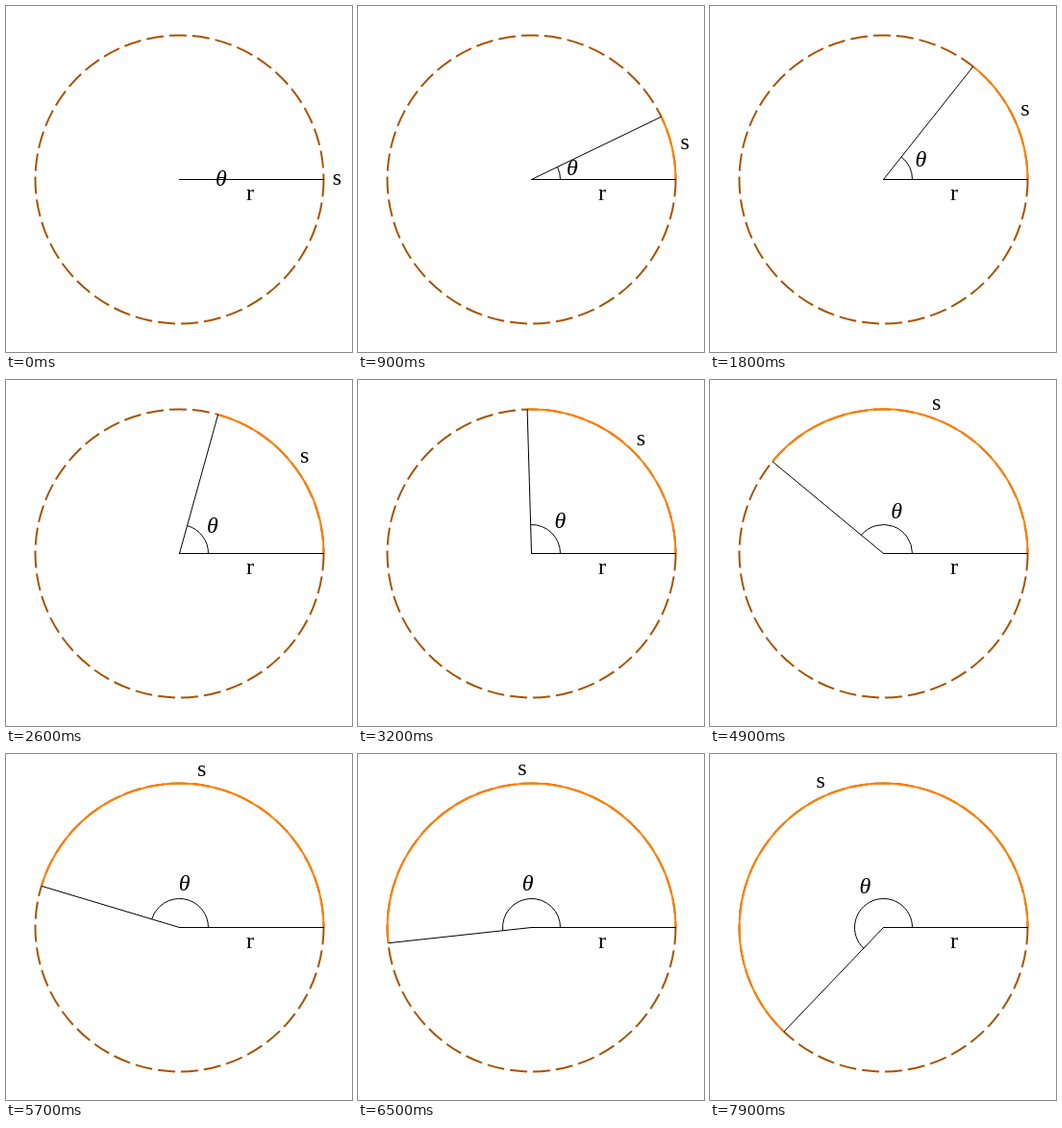
An HTML page for the animation above (8 s loop, 360 px wide and 360 px high).

```html
<!DOCTYPE html>
<html>
<head>
<meta charset="utf-8">
<style>
html, body { margin: 0; width: 100%; height: 100%; overflow: hidden; background: #fff; }
svg { display: block; width: 100vw; height: 100vh; }
path, circle { fill: none; stroke: #000; }
text { font: 24px "Liberation Serif", "Times New Roman", serif; text-anchor: middle; }
#theta { font-style: italic; }
#rim { stroke: #a85400; stroke-width: 2; stroke-dasharray: 18 6; }
#arc { stroke: #ff8000; stroke-width: 2; }
</style>
</head>
<body>
<svg viewBox="0 0 360 360">
  <circle id="rim" cx="180.5" cy="180.5" r="150"/>
  <path id="arc"/>
  <text id="theta">θ</text>
  <text id="s">s</text>
  <text x="254" y="202">r</text>
  <path d="M180 180.5H331"/>
  <path id="radius"/>
  <path id="mark"/>
</svg>
<script>
const C = 180.5, R = 150, LOOP = 8000, STEP = 100, TURN = 0.05;
const $ = id => document.getElementById(id);
const at = (r, a, x = C, y = C) => [x + r * Math.cos(a), y - r * Math.sin(a)];
const sweep = (r, a) => a ? `M${C + r} ${C}A${r} ${r} 0 ${a > Math.PI ? 1 : 0} 0 ${at(r, a)}` : '';

function place(id, [x, y], baseline) {
  $(id).setAttribute('x', x);
  $(id).setAttribute('y', y + baseline);
}

function draw(now) {
  const a = Math.floor(now % LOOP / STEP) * TURN;
  $('arc').setAttribute('d', sweep(R, a));
  $('mark').setAttribute('d', sweep(30, a));
  $('radius').setAttribute('d', a ? `M${C} ${C}L${at(R, a)}` : '');
  place('theta', at(45, a / 2, 179, 178.5), 8);
  place('s', at(164.5, a / 2, 179.8, 180.5), 5.5);
}

const start = performance.now();
function tick() {
  draw(performance.now() - start);
  requestAnimationFrame(tick);
}
tick();
</script>
</body>
</html>
```
